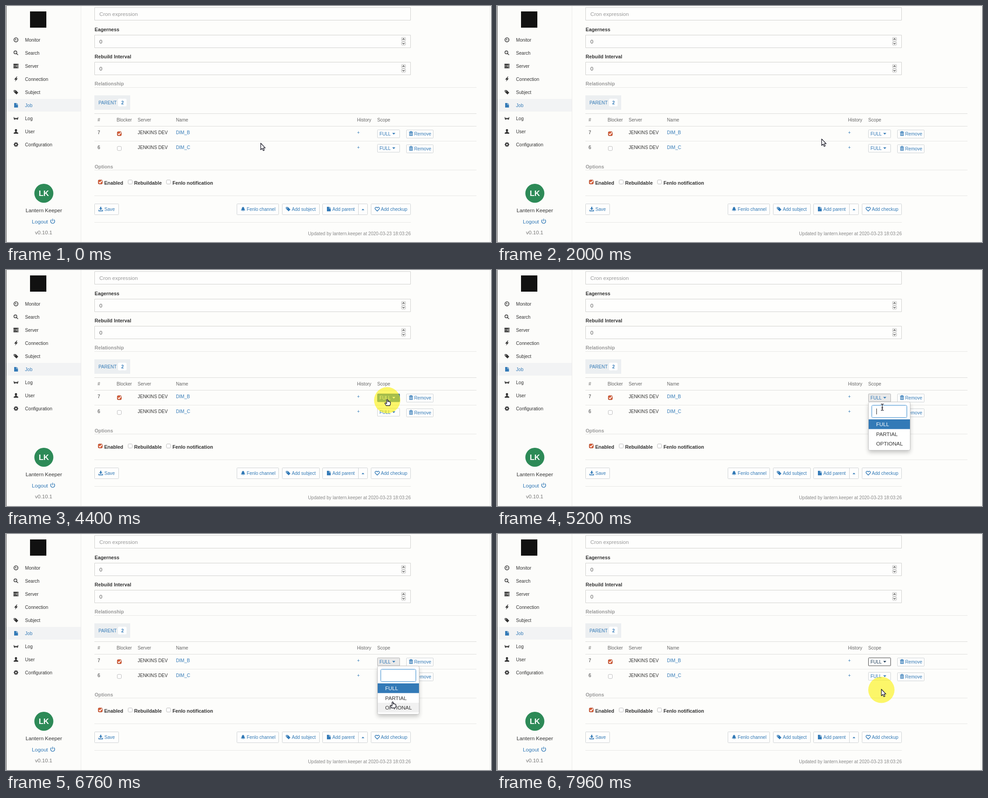
An HTML page with a canvas for the animation above (8000 ms loop, 1070 by 523 pixels).

```html
<!DOCTYPE html>
<html lang="en">
<head>
<meta charset="utf-8">
<title>Job form</title>
<style>
html, body { margin: 0; width: 100%; height: 100%; overflow: hidden; background: #fdfdfb; }
canvas { display: block; width: 1070px; height: 523px; }
</style>
</head>
<body>
<canvas id="stage" width="1070" height="523"></canvas>
<script>
const ctx = document.getElementById('stage').getContext('2d');
const LOOP = 8000;
const FONT = '"Liberation Sans", Arial, sans-serif';
const SMALL = 10.1, BIG = 11.65, BOLD = 10.75;
const BLUE = '#337ab7', INK = '#333', GREY = '#999', PAGE = '#fdfdfb', EDGE = '#ced2d5', RULE = '#e6e6e4';

// y is the middle of the capitals
function text(s, x, y, { size = SMALL, color = INK, bold = false, align = 'left' } = {}) {
  ctx.font = `${bold ? 'bold ' : ''}${size}px ${FONT}`;
  ctx.fillStyle = color;
  ctx.textAlign = align;
  ctx.fillText(s, x, y + size * 0.36);
}

function rect(x, y, w, h, fill, stroke, r = 0) {
  ctx.beginPath();
  ctx.roundRect(x, y, w, h, r);
  if (fill) { ctx.fillStyle = fill; ctx.fill(); }
  if (stroke) { ctx.strokeStyle = stroke; ctx.lineWidth = 1; ctx.stroke(); }
}

function hline(x1, x2, y, color = RULE) {
  ctx.fillStyle = color;
  ctx.fillRect(x1, y, x2 - x1, 1);
}

function disc(x, y, r, color) {
  ctx.beginPath();
  ctx.arc(x, y, r, 0, Math.PI * 2);
  ctx.fillStyle = color;
  ctx.fill();
}

// Icons are centred on 0,0
const FILLED = {
  server: 'M-5.5-5H5.5V-2H-5.5Z M-5.5-1.3H5.5V1.5H-5.5Z M-5.5 2.2H5.5V5H-5.5Z M2-3.8V-3.2H4.5V-3.8Z M0-.2V.4H4.5V-.2Z M3 3.3V3.9H4.5V3.3Z',
  bolt: 'M1.5-5.5L-4 1H-.6L-2 5.5L4-1.5H.6L3-5.5Z',
  tag: 'M-5-4.5H-.5L5 1L1 5L-5-1Z M-3.6-2.3A1 1 0 1 0-1.6-2.3A1 1 0 1 0-3.6-2.3Z',
  file: 'M-4-5H.8V-1.2H4.4V5H-4Z M1.6-5L4.4-2H1.6Z',
  user: 'M0-5.2C3-5.2 3-1.8 1.3.2V1L5 3V5H-5V3L-1.3 1V.2C-3-1.8-3-5.2 0-5.2Z',
  save: 'M-1.3-5H1.3V-1.5H3.8L0 2.3L-3.8-1.5H-1.3Z M-5 1.5H-3.8V3.2H3.8V1.5H5V5H-5Z',
  bell: 'M0-5.2L.9-4.2C3-3.5 3 0 3.4 1.2L5 3H-5L-3.4 1.2C-3 0-3-3.5-.9-4.2Z M-1.5 3.7H1.5L0 5Z',
  trash: 'M-4.5-4H-1.6V-5.2H1.6V-4H4.5V-2.9H-4.5Z M-3.8-2.2H3.8V5H-3.8Z M-2.6-1V3.8H-1.6V-1Z M-.5-1V3.8H.5V-1Z M1.6-1V3.8H2.6V-1Z',
  down: 'M-3.4-1.7H3.4L0 1.9Z',
  up: 'M-3 1.5H3L0-1.7Z'
};
const STROKED = {
  dial: 'M-4.5 0A4.5 4.5 0 1 0 4.5 0A4.5 4.5 0 1 0-4.5 0 M0 1.2L-1.5-2.3 M2.4-.6V.5 M-2.7 0V.6',
  search: 'M-4.5-1.3A3.2 3.2 0 1 0 1.9-1.3A3.2 3.2 0 1 0-4.5-1.3 M1.2 1.2L4.6 4.6',
  glasses: 'M-5-1.2L-3.8-2.5 M5-1.2L3.8-2.5 M-4.2.5A1.6 1.6 0 1 0-1 .5Z M1 .5A1.6 1.6 0 1 0 4.2 .5Z M-4.8 0H4.8',
  power: 'M-2.8-3.4A4.5 4.5 0 1 0 2.8-3.4 M0-5.5V0',
  heart: 'M0 4.6L-4 .5C-6.6-2.5-2.5-6 0-2.6C2.5-6 6.6-2.5 4 .5Z'
};

function icon(name, x, y, color = BLUE) {
  ctx.save();
  ctx.translate(x, y);
  if (name === 'gear') {
    ctx.strokeStyle = color;
    ctx.lineWidth = 2;
    ctx.beginPath();
    for (let i = 0; i < 8; i++) {
      const a = i * Math.PI / 4;
      ctx.moveTo(3 * Math.cos(a), 3 * Math.sin(a));
      ctx.lineTo(5 * Math.cos(a), 5 * Math.sin(a));
    }
    ctx.moveTo(2.7, 0);
    ctx.arc(0, 0, 2.7, 0, Math.PI * 2);
    ctx.stroke();
  } else if (FILLED[name]) {
    ctx.fillStyle = color;
    ctx.fill(new Path2D(FILLED[name]), 'evenodd');
  } else {
    ctx.strokeStyle = color;
    ctx.lineWidth = 1.4;
    ctx.stroke(new Path2D(STROKED[name]));
  }
  ctx.restore();
}

function polyline(points, color, width) {
  ctx.beginPath();
  points.forEach(([x, y]) => ctx.lineTo(x, y));
  ctx.strokeStyle = color;
  ctx.lineWidth = width;
  ctx.stroke();
}

function checkbox(x, y, on) {
  rect(x - 4.5, y - 4.5, 9, 9, on ? '#d9603b' : '#fff', on ? '#a9482b' : '#bbb', 2);
  if (on) polyline([[x - 3, y], [x - 0.8, y + 2.3], [x + 3.8, y - 3.2]], '#fff', 1.8);
}

function button(x, y, w, h) {
  rect(x + 0.5, y + 0.5, w - 1, h - 1, '#fefefd', EDGE, 1);
}

function labelled(x, w, glyph, label, textX) {
  button(x, 438, w, 25);
  icon(glyph, textX - 8, 450);
  text(label, textX, 450, { color: BLUE });
}

function sidebar() {
  rect(0, 0, 166, 523, '#fcfcfa');
  rect(0, 206, 166, 28, '#f2f3f4');
  rect(0, 0, 1, 523, '#444');
  rect(165, 0, 1, 523, '#ebebe9');
  rect(53, 12, 36, 36, '#111');
  const items = [['dial', 'Monitor'], ['search', 'Search'], ['server', 'Server'], ['bolt', 'Connection'],
    ['tag', 'Subject'], ['file', 'Job'], ['glasses', 'Log'], ['user', 'User'], ['gear', 'Configuration']];
  items.forEach(([glyph, label], i) => {
    const y = 75 + i * 29, color = label === 'Job' ? BLUE : INK;
    icon(glyph, 22, y, color);
    text(label, 42, y + 0.4, { color });
  });
  disc(83.5, 415, 21, '#2d8a57');
  text('LK', 83.5, 415, { size: 17, color: '#fff', bold: true, align: 'center' });
  text('Lantern Keeper', 83.5, 453, { size: BIG, align: 'center' });
  text('Logout', 57, 477.5, { size: BIG, color: BLUE });
  icon('power', 103, 477);
  text('v0.10.1', 83, 502, { size: BIG, color: '#777', align: 'center' });
}

function field(y, h, value, color) {
  rect(195.5, y + 0.5, 697, h, '#fefefd', '#d0d0ce');
  text(value, 206, y + h / 2 + 0.5, { size: BIG, color });
}

function numberField(y, label) {
  text(label, 195.5, y - 11.5, { size: BOLD, bold: true });
  field(y, 28, '0', '#555');
  for (const dir of [-1, 1]) {
    const cy = y + 14.2 + dir * 4.7;
    rect(872.5, cy - 4, 9, 8, '#f7f7f6', '#bcbcbc', 2);
    polyline([[874.5, cy - dir], [877, cy + dir * 1.3], [879.5, cy - dir]], '#444', 1.2);
  }
}

function tableRow(id, y, name, on) {
  text(id, 202, y);
  checkbox(250, y + 2.2, on);
  text('JENKINS DEV', 290.5, y);
  text(name, 375, y, { color: BLUE });
  text('+', 777.5, y, { color: BLUE, align: 'center' });
  button(883, y - 6.5, 60, 19);
  icon('trash', 893.5, y + 2);
  text('Remove', 900.5, y + 2.8, { color: BLUE });
}

const SCOPE = {
  normal: ['#fefefd', EDGE, BLUE],
  hover: ['#3077b5', '#2a659b', '#fff'],
  open: ['#e9e9e9', '#b3b3b3', BLUE],
  focus: ['#fefefd', '#444', '#23405c']
};

function scopeButton(y, state) {
  const [fill, edge, ink] = SCOPE[state];
  rect(819.5, y + 0.5, 49, 17.5, fill, edge, 1);
  text('FULL', 824, y + 9.2, { color: ink });
  icon('down', 855.5, y + 9, ink);
}

function form(state) {
  field(3, 28, 'Cron expression', GREY);
  numberField(64, 'Eagerness');
  numberField(124, 'Rebuild Interval');

  text('Relationship', 195.5, 172.5, { size: BOLD, color: GREY, bold: true });
  hline(195, 1038, 180);
  rect(195, 198, 79, 32, '#eceff1');
  text('PARENT', 204, 214, { color: BLUE });
  rect(247, 205.5, 19, 17, '#fff', null, 3);
  text('2', 257, 214.5, { color: BLUE, bold: true, align: 'center' });

  hline(195, 1038, 238, '#dadad8');
  [['#', 202], ['Blocker', 244], ['Server', 290.5], ['Name', 375], ['History', 774.5], ['Scope', 819]]
    .forEach(([s, x]) => text(s, x, 252.5, { color: '#666' }));
  hline(195, 1038, 266, '#dededc');
  tableRow('7', 280.8, 'DIM_B', true);
  hline(195, 1038, 299);
  tableRow('6', 313.5, 'DIM_C', false);
  scopeButton(274, state);
  scopeButton(306, 'normal');

  text('Options', 195.5, 356.5, { size: BOLD, color: GREY, bold: true });
  hline(195, 1038, 363);
  [['Enabled', 208], ['Rebuildable', 274], ['Fenlo notification', 358.5]].forEach(([s, x], i) => {
    checkbox(x, 390, i === 0);
    text(s, x + 8.7, 392, { size: BOLD, bold: true });
  });
  hline(195, 1038, 420);

  labelled(195, 54, 'save', 'Save', 217);
  labelled(509, 93, 'bell', 'Fenlo channel', 531);
  labelled(609, 83, 'tag', 'Add subject', 630.5);
  labelled(698, 100, 'file', 'Add parent', 720);
  rect(777, 438, 1, 25, EDGE);
  icon('up', 787.5, 451);
  labelled(805, 88, 'heart', 'Add checkup', 827);

  hline(195, 893, 479);
  text('Updated by lantern.keeper at 2020-03-23 18:03:26', 893, 504, { color: '#888', align: 'right' });
  rect(1067, 0, 1, 523, '#ebebe9');
}

const OPTIONS = ['FULL', 'PARTIAL', 'OPTIONAL'];
const OPTION_TOP = 331, OPTION_H = 21.5;

function dropdown(hovered, caret) {
  ctx.save();
  ctx.shadowColor = 'rgba(0,0,0,.22)';
  ctx.shadowBlur = 10;
  ctx.shadowOffsetY = 5;
  rect(819.5, 292.5, 92, 107, '#fff', null, 3);
  ctx.restore();
  rect(819.5, 292.5, 92, 107, '#fff', '#c2c2c2', 3);
  rect(826.5, 299.5, 78, 28, '#fff', '#66a5d8', 3);
  rect(827.5, 300.5, 76, 26, null, '#b9d6ee', 2);
  if (caret) rect(837, 307, 1, 13, '#222');
  OPTIONS.forEach((s, i) => {
    const y = OPTION_TOP + i * OPTION_H;
    if (i === 0) rect(820, y, 91, OPTION_H, BLUE);
    else if (i === hovered) rect(820, y, 91, OPTION_H, '#f1f1f1');
    text(s, 836.5, y + 11, { size: BIG, color: i ? INK : '#fff' });
  });
}

const POINTERS = {
  arrow: 'M0 0V14.5L3.3 11.5L5.5 16.6L7.9 15.5L5.7 10.6H10Z',
  hand: 'M-1.3 1C-1.3-.5 1.2-.5 1.2 1V5C2-.1 2.7 4.4 3.6 4.8C4.5 4.3 5.4 4.8 5.6 5.4C6.7 5.2 7.2 6 7.2 7V10L5.8 13.5H-2.2L-5 9C-5.6 7.8-4 6.9-3 8L-1.3 9.3Z',
  beam: 'M-3-7C-1-7 0-6.5 0-5.5C0-6.5 1-7 3-7 M0-5.5V5.5 M-3 7C-1 7 0 6.5 0 5.5C0 6.5 1 7 3 7 M-1.8 1.5H1.8'
};

function pointer(kind, x, y) {
  const path = new Path2D(POINTERS[kind]);
  ctx.save();
  ctx.translate(x, y);
  ctx.lineJoin = 'round';
  if (kind === 'beam') {
    ctx.strokeStyle = '#fff';
    ctx.lineWidth = 3;
    ctx.stroke(path);
  } else {
    ctx.fillStyle = '#fff';
    ctx.fill(path);
  }
  ctx.strokeStyle = '#1c1c28';
  ctx.lineWidth = 1.3;
  ctx.stroke(path);
  ctx.restore();
}

// time, x, y
const PATH = [
  [0, 562, 304], [1380, 562, 304], [2540, 841, 287], [4780, 841, 287], [5200, 850, 304],
  [5560, 850, 304], [6500, 853, 372], [6960, 853, 372], [7520, 848, 344], [LOOP, 848, 344]
];
const OPEN = 4640, CLOSE = 7880, BLINK = 600;
const CLICKS = [[4360, 4760], [7720, LOOP]];

function position(t) {
  const i = PATH.findIndex(p => p[0] > t);
  const [t0, x0, y0] = PATH[i - 1], [t1, x1, y1] = PATH[i];
  const u = (t - t0) / (t1 - t0), e = u * u * (3 - 2 * u);
  return [x0 + (x1 - x0) * e, y0 + (y1 - y0) * e];
}

function draw(t) {
  const [x, y] = position(t);
  const open = t >= OPEN && t < CLOSE;
  const overButton = x >= 819 && x <= 869 && y >= 273 && y <= 292;
  const row = Math.floor((y + 3 - OPTION_TOP) / OPTION_H);
  const overInput = open && y >= 299 && y < 328;
  const overOption = open && row >= 0 && row < OPTIONS.length;
  const state = open ? 'open' : t >= CLOSE ? 'focus' : overButton ? 'hover' : 'normal';

  rect(0, 0, 1070, 523, PAGE);
  sidebar();
  form(state);
  if (open) dropdown(overOption ? row : -1, (t - OPEN) % (2 * BLINK) < BLINK);
  if (CLICKS.some(([a, b]) => t >= a && t < b)) disc(x, y + 1.5, 29, 'rgba(252,242,0,.58)');
  pointer(overInput ? 'beam' : overButton || overOption ? 'hand' : 'arrow', x, y);
}

const start = performance.now();
function tick() {
  draw((performance.now() - start) % LOOP);
  requestAnimationFrame(tick);
}
tick();
</script>
</body>
</html>
```
